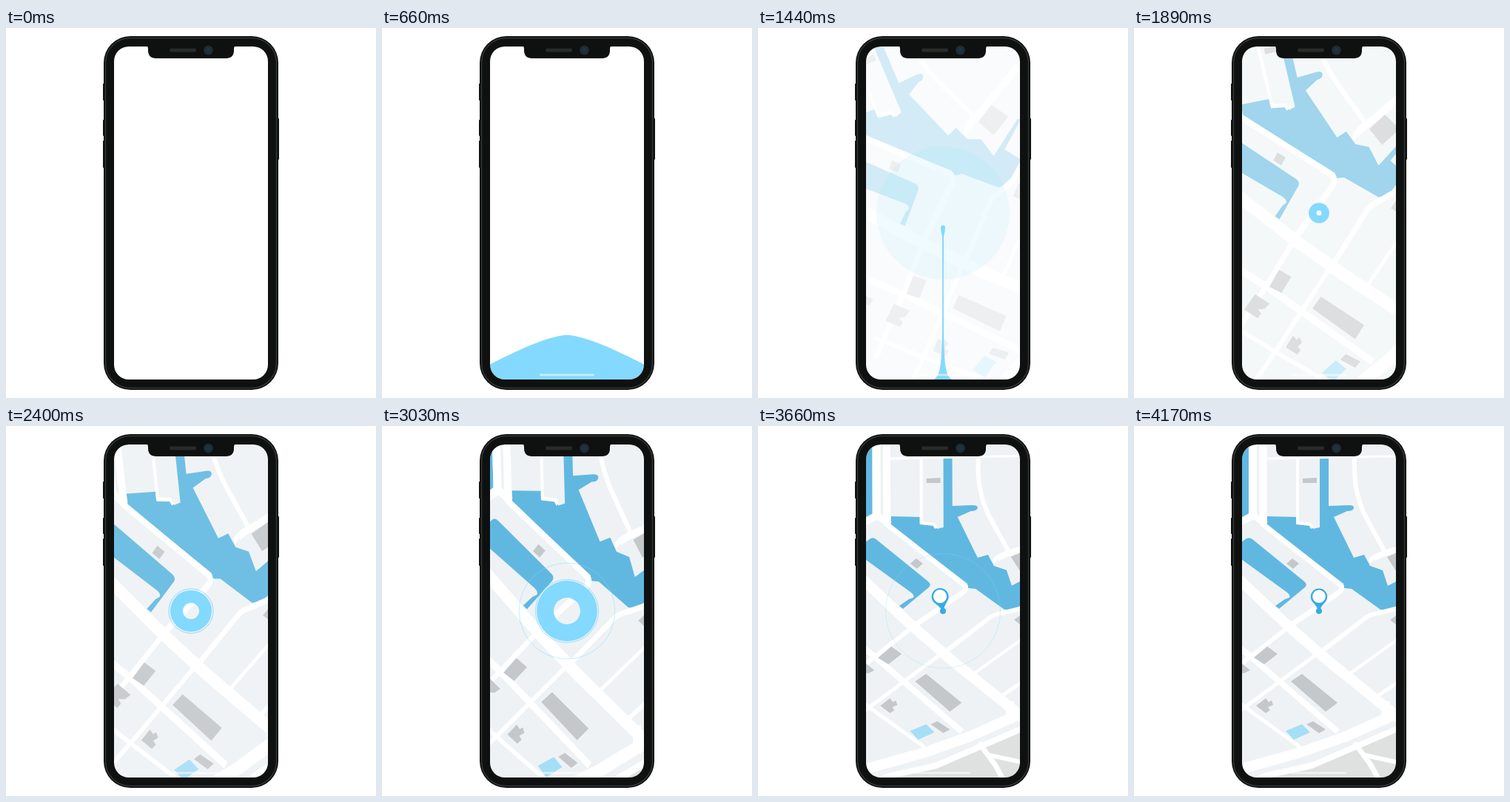
Recreate the animation shown at these times as an HTML page with a canvas. Size 500 by 500 pixels, loop 5.34 s.

```html
<!DOCTYPE html>
<html lang="en">
<head>
<meta charset="utf-8">
<title>Phone map pin</title>
<style>
  html, body { margin: 0; width: 100%; height: 100%; overflow: hidden; background: #fff; }
  canvas { display: block; width: 500px; height: 500px; }
</style>
</head>
<body>
<canvas id="stage" width="500" height="500"></canvas>
<script>
const ctx = document.getElementById('stage').getContext('2d');
const LOOP = 5340;
const TILT = 0.768;
const SKY = '#84d9ff';

const clamp = v => Math.min(1, Math.max(0, v));
const lerp = (a, b, k) => a + (b - a) * k;
const progress = (t, from, to) => clamp((t - from) / (to - from));
const sineInOut = p => (1 - Math.cos(Math.PI * p)) / 2;

// Piecewise linear value through [time, value] keys.
function track(t, ...keys) {
  if (t <= keys[0][0]) return keys[0][1];
  for (let i = 1; i < keys.length; i++) {
    const [t0, v0] = keys[i - 1], [t1, v1] = keys[i];
    if (t <= t1) return lerp(v0, v1, (t - t0) / (t1 - t0));
  }
  return keys[keys.length - 1][1];
}

function fill(path, color) {
  ctx.fillStyle = color;
  ctx.fill(new Path2D(path));
}

function stroke(path, width, color = '#fff') {
  ctx.lineWidth = width;
  ctx.strokeStyle = color;
  ctx.stroke(new Path2D(path));
}

function disc(x, y, r, color) {
  ctx.beginPath();
  ctx.arc(x, y, r, 0, 7);
  ctx.fillStyle = color;
  ctx.fill();
}

function box(x, y, w, h, r, color) {
  ctx.beginPath();
  ctx.roundRect(x, y, w, h, r);
  ctx.fillStyle = color;
  ctx.fill();
}

const WATER = [
  'M120 0H155V118L120 138Z',
  'M180 122L219 123V133L240 134L242 139L251 137V44H263V108L290 107Q298 107 297 111Q296 115 288 115L270 123L297 178L311 174L319 189L336 195L343 216L392 190L396 192L360 214L374 229L371 236L354 245Q346 249 333 248L294 220L284 219L283 213L180 134Z',
  'M130 168L152 152Q156 150 160 153L230 210Q235 214 231 218L196 247L191 243L204 234L210 232Q212 229 207 225L130 169Z'
].join('');

const BUILDINGS = [
  'M228 71L247 70V77H228Z',
  'M206 186L214 179L223 186L215 193Z',
  'M342 177L367 166L382 184L354 196Z',
  'M346 262L360 252L372 262L357 271Z',
  'M162 313L180 298L194 308L176 322Z',
  'M212 345L227 335L275 374L259 386Z',
  'M122 330L141 317L157 330L149 334L140 333L143 338L137 342Z',
  'M165 378L178 368L182 373L186 371L188 377L181 380L184 384L178 388Z',
  'M233 403L242 399L259 410L250 415Z',
  'M102 303L110 298L118 304L110 309Z'
].join('');

const ROADS = [
  [11, 'M160.500 -40V124'],
  [10, 'M174.500 -40V132'],
  [9, 'M100 152L162 121L178 133'],
  [3, 'M180 44L450 39'],
  [4, 'M221 44V131L238 133L241 138'],
  [6, 'M298 -20V60Q299 98 316 128L338 168'],
  [8, 'M322 183Q318 178 354 167L420 140'],
  [7, 'M172 131L279 215Q283 219 277 225L206 273'],
  [14, 'M60 140L146 211L208 270L262 317L350 388L420 448'],
  [8, 'M60 236L157 311L275 413'],
  [6, 'M207 273L156 313L90 362'],
  [5, 'M246 309L150 380L90 422'],
  [5, 'M100 342L150 380L222 432L228 442'],
  [6, 'M253 305L312 260Q320 254 330 253L354 247L430 200'],
  [4, 'M291 335L354 290L430 236'],
  [5, 'M326 367L354 348L420 305'],
  [14, 'M60 486L146 463L222 442L285 420L350 391L430 350'],
  [8, 'M60 515L180 472L240 459L354 410L430 376'],
  [7, 'M298 428L320 458L332 480'],
  [6, 'M308 444L354 454L420 470'],
  [11, 'M340 372V402']
];

function drawMap(t) {
  const opacity = sineInOut(progress(t, 690, 2820));
  if (!opacity) return;
  const turn = -Math.pow(0.001063 * Math.max(0, 4110 - t), 3);
  const squash = lerp(1, TILT, sineInOut(progress(t, 2940, 3540)));

  ctx.save();
  ctx.translate(250, 250);
  ctx.scale(1, squash);
  ctx.rotate(turn * Math.PI / 180);
  ctx.scale(1, 1 / TILT);
  ctx.translate(-250, -250);
  ctx.lineJoin = 'round';
  fill('M-100 -100H600V600H-100Z', '#eef2f4');
  fill('M150 485L250 455L354 411L440 374V600H150Z', '#dfe0e0');
  fill(WATER, '#60b8e1');
  for (const [width, path] of ROADS) stroke(path, width);
  fill(BUILDINGS, '#c4c8cb');
  fill('M205 412L227 403L238 414L216 424Z', '#a6def7');
  ctx.restore();

  // A white veil gives an even fade of the overlapping layers.
  ctx.globalAlpha = 1 - opacity;
  fill('M140 20H360V480H140Z', '#fff');
  ctx.globalAlpha = 1;
}

function drawLiquid(t) {
  if (t <= 270 || t > 1700) return;
  const tip = track(t, [270, 475], [660, 415], [1440, 267], [1530, 250]);
  const foot = track(t, [1500, 475], [1700, 250]);
  if (t <= 1560) {
    const k = progress(t, 660, 1440);
    const rise = progress(t, 270, 660);
    const sink = 1 - progress(t, 1440, 1560);
    const base = track(t, [270, 170], [660, 150], [1440, 13], [1560, 1]);
    const x1 = lerp(95, -1, k), x2 = lerp(40, 1, k), x3 = k;
    const y1 = 475 - lerp(23 * rise, 10 * sink, k);
    const y2 = 475 - lerp(57 * rise, 25 * sink, k);
    fill(`M${250 - base} 476C${250 - x1} ${y1} ${250 - x2} ${y2} ${250 - x3} ${tip}
      H${250 + x3}C${250 + x2} ${y2} ${250 + x1} ${y1} ${250 + base} 476Z`, SKY);
  } else {
    stroke(`M250 ${tip}V${foot}`, 2, SKY);
  }
  const head = 3 * progress(t, 1050, 1400);
  if (head) {
    fill(`M${250 - head} ${tip + 3}Q${250 - head} ${tip} 250 ${tip}Q${250 + head} ${tip} ${250 + head} ${tip + 3}
      Q${250 + head} ${tip + 8} 251 ${tip + 15}H249Q${250 - head} ${tip + 8} ${250 - head} ${tip + 3}Z`, SKY);
  }
}

function drawHalo(t) {
  ctx.globalAlpha = track(t, [1140, 0], [1440, 0.12], [1860, 0]);
  disc(250, 250, track(t, [1140, 80], [1440, 90], [1860, 104]), SKY);
  ctx.globalAlpha = 1;
}

function drawRipple(t, start) {
  const radius = 30 + (t - start) * 0.0553;
  if (t < start || radius > 100) return;
  ctx.globalAlpha = 0.95 * (100 - radius) / 70;
  ctx.beginPath();
  ctx.arc(250, 250, radius, 0, 7);
  ctx.lineWidth = 1;
  ctx.strokeStyle = SKY;
  ctx.stroke();
  ctx.globalAlpha = 1;
}

function drawDot(t) {
  if (t < 1500) return;
  const outer = track(t, [1500, 3], [2400, 28], [3030, 41], [3360, 14.5], [3600, 4]);
  const inner = track(t, [1650, 0], [2400, 11], [3030, 18], [3360, 5], [3480, 0]);
  const red = track(t, [3030, 132], [3360, 53]);
  const green = track(t, [3030, 217], [3360, 181], [3700, 171]);
  const blue = track(t, [3030, 255], [3360, 247], [3700, 227]);
  ctx.beginPath();
  ctx.arc(250, 250, outer, 0, 7);
  ctx.moveTo(250 + inner, 250);
  ctx.arc(250, 250, inner, 0, 7);
  ctx.fillStyle = `rgb(${red},${green},${blue})`;
  ctx.fill('evenodd');
}

function drawPin(t) {
  const size = track(t, [3210, 0], [3360, 0.65], [3540, 1.08], [3720, 1]);
  if (!size) return;
  const swing = t < 3360 ? 30 : 30 * Math.cos((t - 3360) / 95) * Math.pow(1 - progress(t, 3360, 4140), 2);
  ctx.save();
  ctx.translate(250, 250);
  ctx.rotate(swing * Math.PI / 180);
  ctx.scale(size, size);
  fill('M-1 0Q-2 -5 -8 -11.500A11.200 11.200 0 1 1 8 -11.500Q2 -5 1 0Z', '#38abe3');
  disc(0, -19.7, 8.8, '#fff');
  ctx.restore();
}

function drawPhone() {
  box(131, 75, 3, 23, 1, '#111');
  box(131, 124, 3, 22, 1, '#111');
  box(131, 152, 3, 37, 1, '#111');
  box(366, 122, 3, 56, 1, '#111');
  ctx.beginPath();
  ctx.roundRect(132, 11, 236, 478, 36);
  ctx.roundRect(146, 25, 208, 450, 20);
  ctx.fillStyle = '#0f1010';
  ctx.fill('evenodd');
  ctx.beginPath();
  ctx.roundRect(134.5, 13.5, 231, 473, 33.5);
  ctx.lineWidth = 1.5;
  ctx.strokeStyle = '#343535';
  ctx.stroke();
  fill('M190 24H310Q308 25 308 28V30Q308 41 297 41H203Q192 41 192 30V28Q192 25 190 24Z', '#0f1010');
  box(221, 27.5, 36, 5, 2.5, '#292a2a');
  disc(273.5, 30, 6.5, '#202a30');
  disc(273.5, 30, 3.5, '#1b3442');
}

function draw(t) {
  ctx.fillStyle = '#fff';
  ctx.fillRect(0, 0, 500, 500);
  ctx.save();
  ctx.beginPath();
  ctx.roundRect(146, 25, 208, 450, 20);
  ctx.clip();
  drawMap(t);
  drawHalo(t);
  drawLiquid(t);
  drawRipple(t, 2400);
  drawRipple(t, 2803);
  drawDot(t);
  drawPin(t);
  box(213, 467.5, 74, 2.7, 1.3, 'rgba(255,255,255,.55)');
  ctx.restore();
  drawPhone();
}

const start = performance.now();
function frame() {
  draw((performance.now() - start) % LOOP);
  requestAnimationFrame(frame);
}
frame();
</script>
</body>
</html>
```
